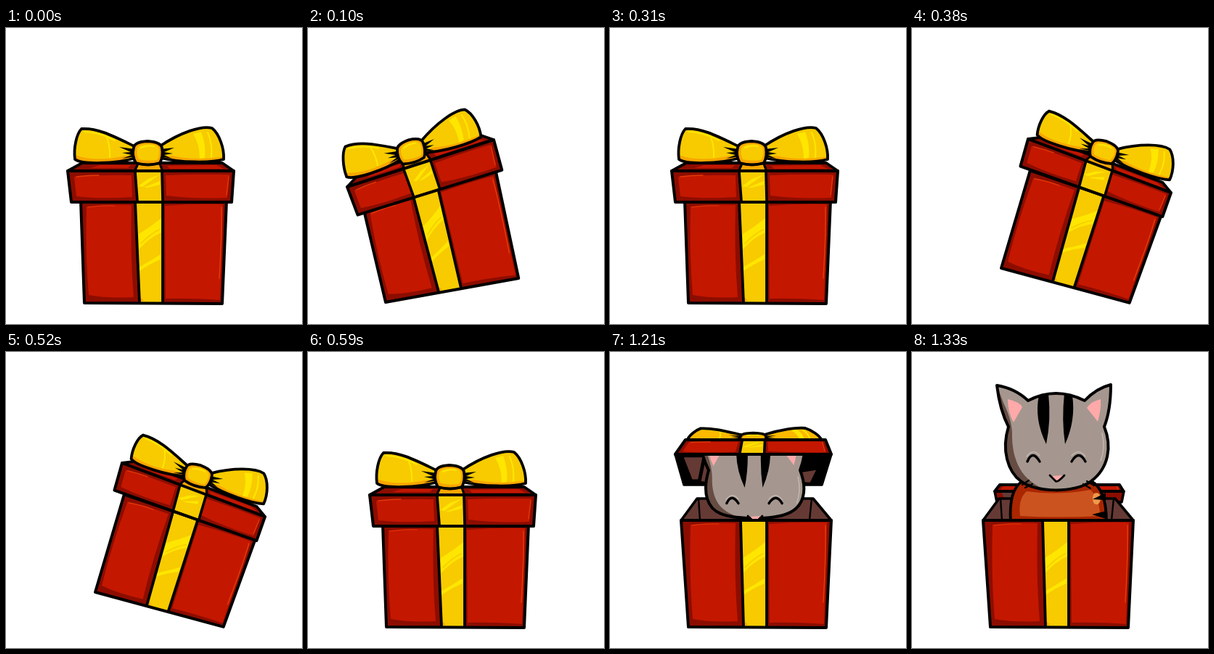
These frames come from a looping animation (408x408 px, 1.83 s). An HTML page with a canvas:

```html
<!DOCTYPE html>
<html lang="en">
<head>
<meta charset="utf-8">
<title>Gift box</title>
<style>
html, body { margin: 0; width: 100%; height: 100%; overflow: hidden; background: #fff; }
canvas { display: block; width: 100vw; height: 100vh; }
</style>
</head>
<body>
<canvas id="stage"></canvas>
<script>
const SIZE = 408, LOOP = 1830;
const RED = '#c41700', DARK = '#8c0d00', GLOW = '#e23a08';
const GOLD = '#f7cb00', BRIGHT = '#ffe600', AMBER = '#f9a600';
const BROWN = '#653a34', FUR = '#a5978f', SHADE = '#664c42', PINK = '#ffa9a9';

const canvas = document.getElementById('stage');
const ctx = canvas.getContext('2d');
const ratio = window.devicePixelRatio || 1;
canvas.width = canvas.height = SIZE * ratio;
ctx.scale(ratio, ratio);
ctx.lineJoin = 'round';
ctx.lineCap = 'round';

const mix = (a, b, k) => a + (b - a) * k;
const mixAll = (a, b, k) => a.map((v, i) => mix(v, b[i], k));

// Bilinear map from a rectangle to a quad given as TL, TR, BR, BL.
function warp([x0, y0, x1, y1], q) {
  if (!q) return (x, y) => [x, y];
  return (x, y) => {
    const u = (x - x0) / (x1 - x0), v = (y - y0) / (y1 - y0);
    return [0, 1].map(i => mix(mix(q[i], q[2 + i], u), mix(q[6 + i], q[4 + i], u), v));
  };
}

// Returns a painter whose path coordinates go through the given map.
function pen(map) {
  return (d, fill, line = 0, color = '#000') => {
    const path = new Path2D(d.replace(/(-?[\d.]+) (-?[\d.]+)/g,
      (_, x, y) => map(+x, +y).join(' ')));
    if (fill) { ctx.fillStyle = fill; ctx.fill(path); }
    if (line) { ctx.strokeStyle = color; ctx.lineWidth = line; ctx.stroke(path); }
  };
}

const BOX = [108, 198, 298, 379], LID = [85, 197, 314, 240], BOW = [95, 138, 300, 184];
const plain = pen((x, y) => [x, y]);

// The lid ribbon shows wider on the side it leans to.
const lean = {
  left: { box: [74, 212, 243, 158, 290, 344, 107, 378], lid: [54, 219, 256, 154, 270, 195, 64, 259],
    bow: [43, 165, 231, 108, 239, 153, 54, 208], spread: [5, 0] },
  farLeft: { box: [44, 230, 196, 144, 282, 322, 107, 378], lid: [26, 240, 208, 137, 229, 175, 42, 279],
    bow: [5, 185, 181, 89, 202, 128, 24, 228], spread: [5, 0] },
  right: { box: [180, 160, 349, 222, 300, 378, 123, 331], lid: [160, 153, 357, 227, 348, 261, 145, 189],
    bow: [181, 111, 370, 172, 354, 212, 172, 150], spread: [0, 5] }
};
const mirror = q => [2, 0, 6, 4].flatMap(i => [405 - q[i], q[i + 1]]);
lean.farRight = {
  box: mirror(lean.farLeft.box), lid: mirror(lean.farLeft.lid),
  bow: mirror(lean.farLeft.bow), spread: [0, 5]
};
const wobble = ['left', 'farLeft', 'left', 'rest', 'right', 'farRight', 'right'];

// Lid poses: lifted, tilted over the head, dropped behind the box.
const lidPose = [
  { front: [85, 180, 311, 180, 314, 217, 82, 218], bow: [92, 134, 304, 134, 304, 173, 92, 173],
    under: [87, 217, 311, 217, 309, 219, 89, 219] },
  { front: [104, 121, 297, 121, 308, 141, 85, 141], bow: [118, 105, 282, 105, 292, 122, 106, 122],
    under: [90, 141, 305, 141, 292, 183, 102, 183] },
  { front: [121, 183, 286, 183, 294, 192, 110, 192], bow: [121, 182, 286, 182, 286, 184, 121, 184],
    under: [114, 192, 292, 192, 289, 207, 117, 207] }
];

function drawBox(p, open) {
  const y = open ? 232 : 238, l = open ? 98 : 103, r = open ? 305 : 304, s = open ? 180 : 178;
  const top = open ? 238 : 246;
  const shape = `M${l} ${y} L108 379 L298 380 L${r} ${y} Z`;
  p(shape, DARK);
  p(`M111 ${top} Q140 ${top - 3} 173 ${top - 2} Q171 310 176 371 Q140 373 114 368 Q109 310 111 ${top} Z`, RED);
  p(`M219 ${top - 1} Q260 ${top - 4} 299 ${top - 3} L295 375 Q255 372 220 373 Z`, RED);
  p(`M297 ${top + 1} Q298 280 294 345`, null, 1.5, GLOW);
  p(`M113 ${top + 1} Q135 ${top - 2} 150 ${top - 1}`, null, 1.2, GLOW);
  p(`M${s} ${y} L184 378 L216 378 L216 ${y} Z`, GOLD);
  p('M183 305 Q199 288 214 282 L214 262 Q198 275 183 284 Z', BRIGHT);
  p('M186 297 Q200 283 211 278', null, 1.5, GOLD);
  p('M183 330 Q199 321 213 312 L213 319 Q198 325 184 335 Z', BRIGHT);
  p('M183 369 L190 376 L184 377 Z', AMBER);
  p(`M${s} ${y} L184 378 M216 ${y} L216 378`, null, 3.8);
  p(shape, null, 4);
}

function drawLidTop(p, [a, b]) {
  p('M85 197 L105 186 L298 186 L314 197 Z', DARK, 3.8);
  p('M116 193 L130 189 L172 189 L168 193 Z M222 190 L290 189 L300 194 L226 194 Z', RED);
  p(`M${182 - a} 187 L${177 - a} 198 L${216 + b} 198 L${212 + b} 187 Z`, AMBER, 3.2);
}

function drawLidFront(p, [a, b]) {
  const shape = 'M85 197 L90 240 L311 240 L314 197 Z';
  const l = 178 - a, r = 215 + b;
  p(shape, DARK);
  p('M94 205 Q130 202 173 203 L174 233 Q130 236 97 232 Z', RED);
  p('M220 203 Q265 201 308 202 L305 234 Q260 236 221 231 Z', RED);
  p('M307 205 L304 230 M97 205 Q112 203 128 203', null, 1.3, GLOW);
  p(`M${l} 198 L${l + 3} 238 L${r + 1} 238 L${r} 198 Z`, GOLD);
  p('M182 218 L196 208 L212 202 L188 219 Z M190 220 L212 211 L212 216 L195 220 Z', BRIGHT);
  p(`M${l} 198 L${l + 3} 238 M${r} 198 L${r + 1} 238`, null, 3.6);
  p(shape, null, 4);
}

function drawBow(p, color) {
  const left = 'M177 163 C150 150 126 137 104 139 C97 146 93 166 95 181 C104 188 150 188 179 179 Z';
  const right = 'M212 163 C240 144 270 134 284 138 C294 146 301 166 300 181 C284 186 240 186 213 179 Z';
  const knot = 'M176 165 Q177 157 195 156 Q213 157 215 165 Q217 178 212 186 Q196 191 179 186 Q173 176 176 165 Z';
  p(left, color);
  p(right, color);
  p('M95 181 Q96 174 98 176 Q125 185 165 176 L179 179 C150 188 104 188 95 181 Z', AMBER);
  p('M300 181 Q299 176 296 178 Q260 183 228 176 L213 179 C240 186 284 186 300 181 Z', AMBER);
  p('M258 146 L269 143 Q276 162 274 179 L267 180 Q267 160 258 146 Z', BRIGHT);
  p('M278 144 Q285 160 283 178', null, 2, BRIGHT);
  p('M108 143 Q130 144 150 155 M139 151 Q144 164 143 178', null, 2, BRIGHT);
  p('M178 167 L156 164 L172 171 L160 172 L173 175 L160 180 L179 177 Z', '#000');
  p('M212 167 L232 165 L218 171 L230 173 L218 175 L229 180 L212 177 Z', '#000');
  p(left, null, 3.8);
  p(right, null, 3.8);
  p(knot, AMBER);
  p('M181 166 Q183 160 196 160 Q210 160 211 167 Q212 177 208 182 Q194 184 183 181 Q179 174 181 166 Z', color);
  p('M186 165 Q194 161 204 163', null, 2, BRIGHT);
  p(knot, null, 3.8);
}

// While pushing up, the face is bowed: chin drawn in, head a little narrower.
function drawCat(step) {
  const drop = (7 - step) * 20, bowed = Math.min(1, drop / 60);
  const chin = 1 - 0.48 * bowed, lift = -4 * bowed;
  const shift = pen((x, y) => [x, y + drop]);
  const nose = pen((x, y) => [x, y + drop + lift]);
  const p = pen((x, y) => [mix(x, 199, 0.045 * bowed), (y > 146 ? 146 + (y - 146) * chin : y) + drop]);
  const head = 'M117 46 Q121 80 133 103 C123 135 132 165 150 178 C170 194 225 195 247 178 ' +
    'C271 160 276 130 265 103 Q274 80 274 45 Q254 50 238 67 Q198 47 160 67 Q142 50 117 46 Z';
  shift('M136 234 C134 205 140 186 152 178 L247 178 C262 186 268 205 268 234 Z', '#a92600', 3.8);
  shift('M149 226 Q146 202 158 192 Q200 198 246 190 Q259 202 259 226 Q200 229 149 226 Z', '#cb531f');
  shift('M251 195 Q260 192 260 203 Q258 213 251 209 Q247 202 251 195 Z', '#ef984c');
  shift('M249 203 L267 194 L267 204 Z M248 224 L268 219 L268 230 Z', '#000');
  p(head, FUR);
  p('M117 46 Q121 80 133 103 C123 135 132 165 150 178 Q163 189 186 190 C158 181 139 158 138 118 Q139 96 126 70 Z', SHADE);
  p('M132 65 Q149 69 152 76 L140 97 Q132 83 132 65 Z M260 65 Q247 68 241 77 L256 96 Q261 80 260 65 Z', PINK);
  p('M175 60 Q168 92 185 127 Q192 94 188 57 Z M210 57 Q206 94 211 127 Q226 94 221 60 Z', '#000');
  p('M158 144 Q167 132 176 143 M220 143 Q230 132 239 144', null, 1.5, '#c2b8b2');
  p('M262 112 Q267 132 260 150', null, 1.5, '#c2b8b2');
  p('M159 151 Q166 134 176 151 M220 151 Q230 134 239 151', null, 3.4);
  p(head, null, 4);
  nose('M193 171 L208 170 L200 178 Z', PINK);
  nose('M190 170 L198 178 Q201 180 210 170', null, 2.8);
  shift('M152 183 L161 177 M156 187 L166 182 M236 182 L246 188 M241 178 L251 184', null, 2.2);
}

function drawClosed(pose) {
  const lid = pen(warp(LID, pose.lid)), spread = pose.spread || [0, 0];
  drawBox(pen(warp(BOX, pose.box)), false);
  drawLidTop(lid, spread);
  drawBow(pen(warp(BOW, pose.bow)), GOLD);
  drawLidFront(lid, spread);
}

function drawInside(step) {
  const [xl, y, xr] = mixAll([107, 219, 298], [120, 202, 280], Math.min(1, (step - 1) / 3));
  plain(`M98 232 L${xl} ${y} L${xr} ${y} L305 232 Z`, step === 1 ? '#000' : BROWN, 3.6);
  if (step === 1) plain('M139 217 L254 217 L254 228 L139 228 Z', '#4b2d22');
  else plain(`M${xl + 2} ${y} L${xl + 4} 232 M${xr - 2} ${y} L${xr - 5} 232`, null, 2.4);
}

function drawUnder(q, step) {
  const p = pen(warp([0, 0, 100, 100], q));
  p('M0 0 L100 0 L100 100 L0 100 Z', step > 4 ? DARK : '#000', 3.6);
  if (step > 1) {
    p('M5 10 L17 10 L11 82 L7 82 Z M18 28 L21 50 L21 94 L13 88 Z', BROWN);
    p('M80 62 L93 52 L91 92 L80 90 Z', BROWN);
  }
}

function drawOpen(step) {
  const late = step > 4, k = (step - (late ? 4 : 1)) / 3;
  const [from, to] = late ? lidPose.slice(1) : lidPose;
  const pose = part => mixAll(from[part], to[part], k);
  const front = pose('front');
  const lid = pen(warp(LID, front));

  const lidOver = () => {
    if (step < 3) drawLidTop(lid, [0, 0]);
    if (step < 6) drawBow(pen(warp(BOW, pose('bow'))), step > 2 ? '#fbb900' : GOLD);
    drawLidFront(lid, [0, 0]);
  };

  if (late) {
    drawUnder(pose('under'), step);
    lidOver();
    drawInside(step);
    drawCat(step);
  } else {
    drawInside(step);
    drawUnder(pose('under'), step);
    if (step > 1) {
      ctx.save();
      ctx.beginPath();
      ctx.rect(0, front[5], SIZE, SIZE);
      ctx.clip();
      drawCat(step);
      ctx.restore();
    }
  }
  // The box front hides whatever reaches below the rim.
  drawBox(plain, true);
  if (!late) lidOver();
}

function draw(t) {
  ctx.fillStyle = '#fff';
  ctx.fillRect(0, 0, SIZE, SIZE);
  // Nothing may hang out below the box.
  ctx.save();
  ctx.beginPath();
  ctx.rect(0, 0, SIZE, 383);
  ctx.clip();
  if (t >= 1090) drawOpen(Math.min(7, Math.floor((t - 1090) / 40) + 1));
  else drawClosed((t >= 100 && lean[wobble[Math.floor((t - 100) / 70)]]) || {});
  ctx.restore();
}

const start = performance.now();
function tick() {
  draw((performance.now() - start) % LOOP);
  requestAnimationFrame(tick);
}
tick();
</script>
</body>
</html>
```
